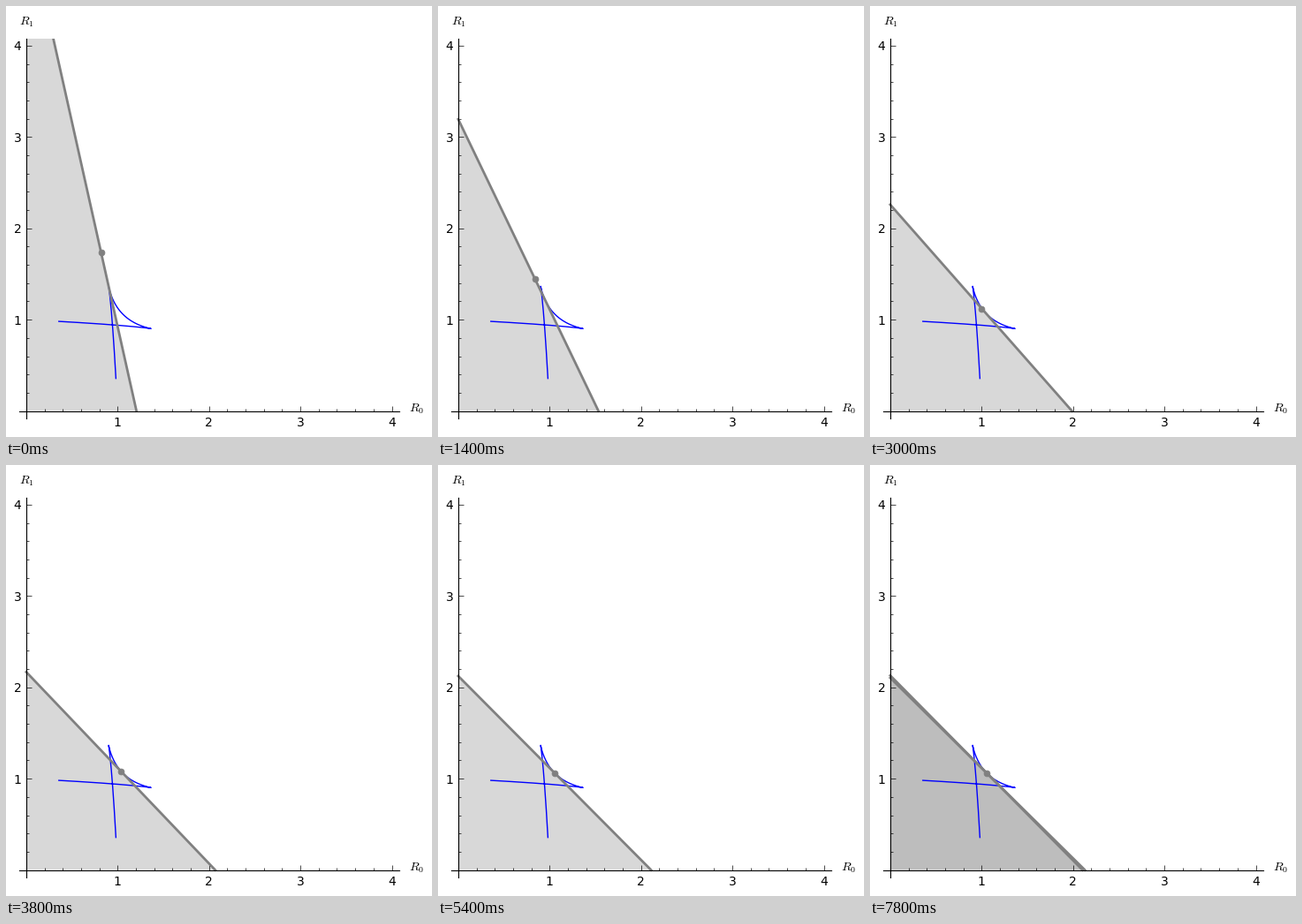
A matplotlib script that plays this animation: 482x488 px, repeating every 8 s.

```python
import matplotlib.pyplot as plt
import numpy as np
from matplotlib.animation import FuncAnimation
from matplotlib.ticker import FixedLocator, FormatStrFormatter

W, H, DPI = 482, 488, 100
UNIT = 103.4             # pixels per axis unit
X0, Y0 = 22.9, 458.55    # origin in pixels, from the top left
LOW, HIGH = -0.08, 4.08
FRAMES, INTERVAL = 40, 200
BRANCH = 34              # step at which the population splits in two
SPEED, SUB = 0.025, 20
GRAY = "0.5"

plt.rcParams.update({"font.family": "DejaVu Sans", "font.size": 10,
                     "mathtext.fontset": "cm"})


def uptake(x):
    """Consumption rates of trait x on the two resources."""
    return np.exp(-3 * x**2), np.exp(-3 * (1 - x)**2)


def single(x):
    """Population size and resource levels with one resident trait."""
    u, v = uptake(x)
    n = (2 * (u + v) - 1) / (u * u + v * v)
    return n, 2 - u * n, 2 - v * n


def pair(d):
    """The same for each of two residents at 0.5 - d and 0.5 + d."""
    u, v = uptake(0.5 - d)
    r = 1 / (u + v)
    return (2 - r) / (u + v), r, r


def slope(x, env):
    n, r0, r1 = env
    u, v = uptake(x)
    return SPEED * n * 6 * ((1 - x) * v * r1 - x * u * r0)


def evolve():
    """List of (traits, dot position), one per frame."""
    states = []
    x, d = 0.25, 0.0014
    for i in range(FRAMES):
        if i < BRANCH:
            states.append(((x,), single(x)[1:]))
            for _ in range(SUB):
                mid = x + slope(x, single(x)) / SUB / 2
                x += slope(mid, single(mid)) / SUB
        else:
            states.append(((0.5 - d, 0.5 + d), pair(d)[1:]))
            for _ in range(SUB):
                d -= slope(0.5 - d, pair(d)) / SUB
    return states


STATES = evolve()

fig = plt.figure(figsize=(W / DPI, H / DPI), dpi=DPI, facecolor="white")
side = UNIT * (HIGH - LOW)
ax = fig.add_axes([(X0 + LOW * UNIT) / W, (H - Y0 + LOW * UNIT) / H,
                   side / W, side / H])
ax.set(xlim=(LOW, HIGH), ylim=(LOW, HIGH))
ax.patch.set_visible(False)
for name in ("top", "right"):
    ax.spines[name].set_visible(False)
for name in ("left", "bottom"):
    ax.spines[name].set_position("zero")
    ax.spines[name].set_linewidth(0.8)
for axis in (ax.xaxis, ax.yaxis):
    axis.set_major_locator(FixedLocator([1, 2, 3, 4]))
    axis.set_minor_locator(FixedLocator(np.arange(1, 21) / 5))
    axis.set_major_formatter(FormatStrFormatter("%d"))
ax.tick_params(which="major", direction="in", length=4, width=0.5, pad=4)
ax.tick_params(which="minor", direction="in", length=2, width=0.5)
ax.tick_params(axis="x", which="major", pad=5)
for label, px, py in (("$R_0$", 465, 456.5), ("$R_1$", 23, 18.5)):
    fig.text(px / W, 1 - py / H, label, ha="center", va="center")

# Envelope of all boundary lines
t = np.linspace(0.02, 0.98, 400)
u, v = uptake(t)
ax.plot((1 - t) / u, t / v, color="blue", lw=1, zorder=2)

areas = [ax.fill([0, 0, 0], [0, 0, 0], color=GRAY, alpha=0.3, lw=0,
                 zorder=1)[0] for _ in range(2)]
lines = [ax.plot([], [], color=GRAY, lw=2, zorder=2.1,
                 solid_capstyle="projecting")[0] for _ in range(2)]
dot, = ax.plot([], [], "o", color=GRAY, ms=5, mew=0.5, zorder=2.2)


def draw(i):
    traits, (r0, r1) = STATES[i]
    for k, (area, line) in enumerate(zip(areas, lines)):
        shown = k < len(traits)
        area.set_visible(shown)
        line.set_visible(shown)
        if shown:
            u, v = uptake(traits[k])
            area.set_xy([(0, 0), (0, 1 / v), (1 / u, 0)])
            line.set_data([0, 1 / u], [1 / v, 0])
    dot.set_data([r0], [r1])
    return [*areas, *lines, dot]


anim = FuncAnimation(fig, draw, frames=FRAMES, interval=INTERVAL,
                     init_func=lambda: draw(0), repeat=True, repeat_delay=0)
plt.show()
```
